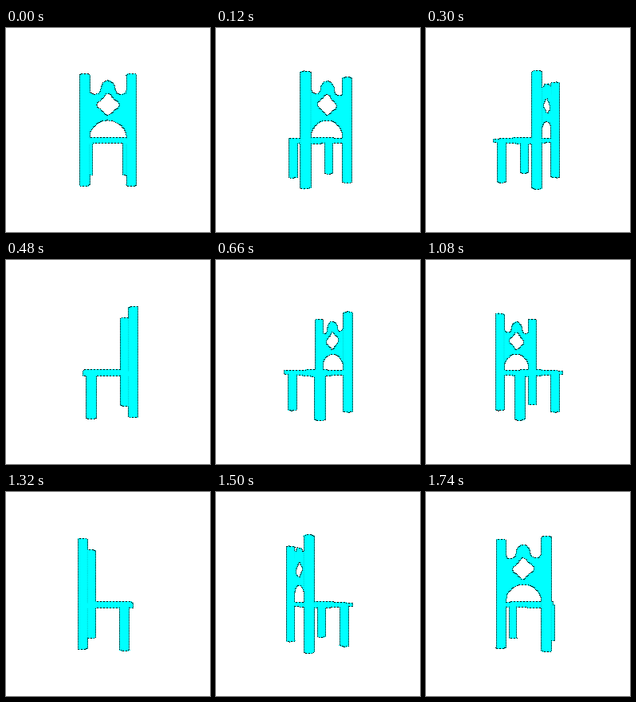
Animation, 256 px wide and 256 px high, one loop 1800 ms. Source, as an HTML page without scripts:

```html
<!DOCTYPE html>
<html lang="en">
<head>
<meta charset="utf-8">
<title>Turning chair</title>
<style>
  html, body { margin: 0; width: 100%; height: 100%; overflow: hidden; background: #fff; }

  .stage { position: absolute; left: 0; top: 0; width: 256px; height: 256px; filter: url(#edge); }
  .view { position: absolute; inset: 0; perspective: 230px; }
  .chair {
    position: absolute; left: 128px; top: 128px; width: 0; height: 0;
    transform-style: preserve-3d;
    animation: turn 1.8s steps(30) infinite;
  }
  @keyframes turn { from { transform: rotateY(0deg); } to { transform: rotateY(360deg); } }

  /* flat faces, centred on their own origin */
  .face {
    position: absolute; left: 0; top: 0; box-sizing: border-box;
    width: var(--w); height: var(--h); background: #0ff;
    transform-origin: 0 0;
    transform: translate3d(var(--x, 0px), var(--y, 0px), var(--z, 0px)) var(--r, rotate(0deg)) translate(-50%, -50%);
  }
  .flat { --w: 60px; --h: 57px; --z: -2.5px; --r: rotateX(90deg); }
  .rim { --w: 60px; --h: 5px; --y: 13px; }
  .side { --w: 57px; --z: -2.5px; --r: rotateY(90deg); }

  /* round posts: a strip that always faces the viewer, plus two caps */
  .post {
    --len: 123px;
    position: absolute; left: 0; top: 0; width: 0; height: 0;
    transform-style: preserve-3d;
    transform: translate3d(var(--px), var(--py, 0px), var(--pz));
  }
  .leg { --len: 48px; --py: 37.5px; }
  .post::before, .post::after {
    content: ""; position: absolute; left: 0; top: 0;
    width: 12px; height: 12px; border-radius: 50%; background: #0ff;
    transform-origin: 0 0;
    transform: translateY(calc(var(--len) * var(--end))) rotateX(90deg) translate(-50%, -50%);
  }
  .post::before { --end: -.5; }
  .post::after { --end: .5; }
  .strip {
    position: absolute; left: 0; top: 0; width: 0; height: 0;
    transform-style: preserve-3d;
    animation: unturn 1.8s steps(30) infinite;
  }
  .strip .face { --w: 12px; --h: var(--len); border: dotted #0003; border-width: 0 1px; }
  @keyframes unturn { from { transform: rotateY(0deg); } to { transform: rotateY(-360deg); } }

  .panel { --w: 52px; --h: 70px; --y: -21px; background: none; fill: #0ff; }
  .defs { position: absolute; width: 0; height: 0; }
</style>
</head>
<body>
<svg class="defs">
  <defs>
    <path id="back" fill-rule="evenodd" d="M-26 12V-46H-21A6.5 6.5 0 0 0-8-46A8 9 0 0 1 8-46A6.5 6.5 0 0 0 21-46H26V12H21.5A21.5 22.7 0 0 0-21.5 12Z
      M-3-39Q0-42 3-39Q5-35 11-31Q14-28 11-25Q5-21 3-18Q0-15-3-18Q-5-21-11-25Q-14-28-11-31Q-5-35-3-39Z"/>
    <filter id="edge" filterUnits="userSpaceOnUse" x="0" y="0" width="256" height="256" color-interpolation-filters="sRGB">
      <feComponentTransfer in="SourceGraphic" result="solid"><feFuncA type="discrete" tableValues="0 1"/></feComponentTransfer>
      <feMorphology in="solid" operator="erode" radius="1" result="core"/>
      <feComposite in="solid" in2="core" operator="out" result="line"/>
      <feFlood x="0" y="0" width="2" height="1" flood-color="#000" result="a"/>
      <feFlood x="2" y="1" width="2" height="1" flood-color="#000" result="b"/>
      <feMerge x="0" y="0" width="4" height="2" result="dots"><feMergeNode in="a"/><feMergeNode in="b"/></feMerge>
      <feTile in="dots" x="0" y="0" width="256" height="256" result="grain"/>
      <feComposite in="grain" in2="line" operator="in" result="ink"/>
      <feMerge><feMergeNode in="solid"/><feMergeNode in="ink"/></feMerge>
    </filter>
  </defs>
</svg>

<div class="stage"><div class="view"><div class="chair">
  <div class="post" style="--px:-26px;--pz:26px"><div class="strip"><div class="face"></div></div></div>
  <div class="post" style="--px:26px;--pz:26px"><div class="strip"><div class="face"></div></div></div>
  <div class="post leg" style="--px:-26px;--pz:-21px"><div class="strip"><div class="face"></div></div></div>
  <div class="post leg" style="--px:26px;--pz:-21px"><div class="strip"><div class="face"></div></div></div>

  <svg class="face panel" style="--z:24px" viewBox="-26 -56 52 70"><use href="#back"/></svg>
  <svg class="face panel" style="--z:26px" viewBox="-26 -56 52 70"><use href="#back"/></svg>
  <svg class="face panel" style="--z:28px" viewBox="-26 -56 52 70"><use href="#back"/></svg>

  <div class="face flat" style="--y:10.5px"></div>
  <div class="face flat" style="--y:15.5px"></div>
  <div class="face rim" style="--z:-31px"></div>
  <div class="face rim" style="--z:26px"></div>
  <div class="face rim side" style="--x:-30px"></div>
  <div class="face rim side" style="--x:30px"></div>
</div></div></div>
</body>
</html>
```
